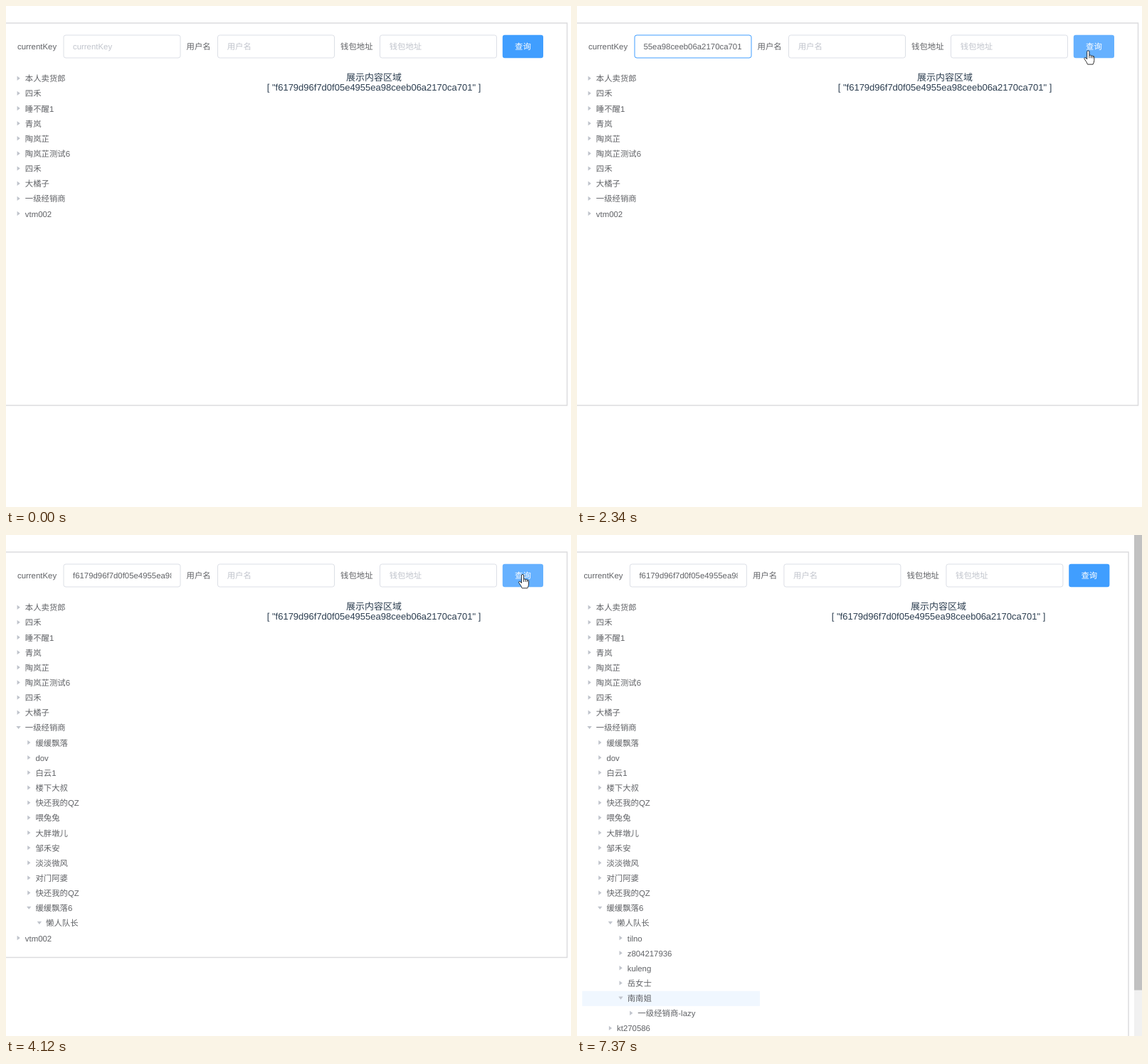
These frames come from a looping animation (794x705 px, 8000 ms). An HTML page:

```html
<!DOCTYPE html>
<html lang="zh-CN">
<head>
<meta charset="utf-8">
<title>Tree search</title>
<style>
  html, body { margin: 0; width: 100%; height: 100%; overflow: hidden; background: #fff; }
  svg { display: block; width: 794px; height: 705px; }
  text {
    font: 11.4px "Liberation Sans", Arial, "Noto Sans CJK SC", "Noto Sans CJK", sans-serif;
    fill: #606266; text-rendering: geometricPrecision; white-space: pre;
  }
  .hint { fill: #c0c4cc; }
  .result text { font-size: 13px; fill: #2c3e50; text-anchor: middle; }
  .box { fill: #fff; stroke: #dcdfe6; }
  .caret { fill: #c0c4cc; }
  .pointer { fill: #fff; stroke: #000; stroke-width: .8; stroke-linejoin: round; }
</style>
</head>
<body>
<svg viewBox="0 0 794 705">
  <defs>
    <clipPath id="valueClip"><rect x="93.5" y="42" width="138.8" height="30"/></clipPath>
    <clipPath id="branchClip"><rect id="branchArea" x="0" y="282.4" width="300" height="0"/></clipPath>
  </defs>
  <rect id="panel" x="-20" y="24" fill="none" stroke="#dcdcde" stroke-width="1.5"/>
  <rect id="current" x="7.3" y="641.7" width="249.7" height="21.15" fill="#f0f7ff"/>
  <g id="roots"></g>
  <g id="branch" clip-path="url(#branchClip)"></g>
  <g id="last"></g>
  <g id="form">
    <g id="fields"></g>
    <g clip-path="url(#valueClip)"><text id="value" y="61"></text></g>
    <rect id="textCaret" y="50.5" width="1" height="13" fill="#303133"/>
    <rect id="button" x="697.8" y="40.7" width="57.2" height="32.5" rx="3.2"/>
    <text x="726.4" y="61" text-anchor="middle" style="fill:#fff">查询</text>
  </g>
  <g id="result" class="result">
    <text x="517" y="105.3">展示内容区域</text>
    <text id="keyLine" x="517" y="119.1"></text>
  </g>
  <g id="scrollbar">
    <rect x="783" width="11" height="705" fill="#f1f1f1"/>
    <rect x="783" width="11" height="640.5" fill="#c1c1c1"/>
  </g>
  <g id="cursor">
    <path id="arrow" class="pointer" d="M.5 .5V13.6L3.5 10.8L5.7 16L7.8 15.1L5.6 10H9.6Z"/>
    <path id="beam" d="M-3 -6.5H-.7L0 -6L.7 -6.5H3M0 -6V6M-3 6.5H-.7L0 6L.7 6.5H3" fill="none" stroke="#222" stroke-width="1.1"/>
    <path id="hand" class="pointer" d="M-1.6 11.5V1Q-1.6 -.5 0 -.5T1.6 1V6.2Q3 5 4.2 6.8Q5.6 5.8 6.6 7.4Q8.5 6.8 8.5 9V13Q8.5 15.5 6.8 18.8H-.8Q-2 15.5-5 11.6Q-6 9.8-4.6 9.2Q-3.4 9-1.6 11.5ZM1.6 6.2V10M4.2 6.8V10M6.6 7.4V10.2"/>
  </g>
</svg>
<script>
const $ = id => document.getElementById(id);
const NS = 'http://www.w3.org/2000/svg';
const LOOP = 8000, TICK = 77.6;
const ROW = 21.15, TREE_TOP = 92, INDENT = 14.64;
const KEY = 'f6179d96f7d0f05e4955ea98ceeb06a2170ca701';

function add(parent, tag, attrs, text = '') {
  const el = document.createElementNS(NS, tag);
  for (const name in attrs) el.setAttribute(name, attrs[name]);
  el.textContent = text;
  parent.append(el);
  return el;
}
const set = (id, name, value) => $(id).setAttribute(name, value);
const show = (id, on) => set(id, 'visibility', on ? 'visible' : 'hidden');
const shift = (id, x, y) => set(id, 'transform', `translate(${x} ${y})`);

const RIGHT = 'M-2 -3.2L2.2 0L-2 3.2Z', DOWN = 'M-3.2 -2H3.2L0 2.2Z';
function addRow(parent, index, level, label, open) {
  const x = 17.6 + level * INDENT, mid = TREE_TOP + (index + .5) * ROW;
  add(parent, 'text', { x: x + 9.2, y: mid + 3.7 }, label);
  return add(parent, 'path', { class: 'caret', d: open ? DOWN : RIGHT, transform: `translate(${x} ${mid - .9})` });
}

const roots = ['本人卖货郎', '四禾', '睡不醒1', '青岚', '陶岚芷', '陶岚芷测试6', '四禾', '大橘子', '一级经销商'];
const children = ['缓缓飘落', 'dov', '白云1', '楼下大叔', '快还我的QZ', '喂兔兔', '大胖墩儿', '邹禾安',
  '淡淡微风', '对门阿婆', '快还我的QZ'];
const nested = [[1, '缓缓飘落6', true], [2, '懒人队长', true], [3, 'tilno'], [3, 'z804217936'], [3, 'kuleng'],
  [3, '岳女士'], [3, '南南姐', true], [4, '一级经销商-lazy'], [2, 'kt270586']];
const branchRows = [...children.map(name => [1, name]), ...nested];

const rootCarets = roots.map((name, i) => addRow($('roots'), i, 0, name));
const dealerCaret = rootCarets[8];
branchRows.forEach(([level, name, open], i) => addRow($('branch'), 9 + i, level, name, open));
addRow($('last'), 9, 0, 'vtm002');

const boxes = [[16, 'currentKey', 81], [253.5, '用户名', 297.5], [470, '钱包地址', 525.5]].map(([x, label, left], i) => {
  add($('fields'), 'text', { x, y: 61 }, label);
  const box = add($('fields'), 'rect', { class: 'box', x: left, y: 41, width: 164, height: 32, rx: 3 });
  if (i) add($('fields'), 'text', { class: 'hint', x: left + 13.2, y: 61 }, label);
  return box;
});
$('keyLine').textContent = `[ "${KEY}" ]`;

// Pointer path: tick, x, y of the hotspot
const track = [[1, 708, 655], [4, 520, 330], [7, 300, 80], [9, 170, 52], [11, 127, 66], [12, 127, 67], [13, 127, 67],
  [14, 131, 69], [19, 204, 67], [21, 235, 70], [26, 677, 93], [28, 703, 78], [31, 726, 56], [56, 726, 56],
  [60, 677, 100], [64, 260, 600], [66, 75, 641], [67, 91, 641], [68, 91, 642], [69, 91, 642], [70, 110, 650], [75, 743, 546]];

function pointerAt(k) {
  const i = Math.max(1, track.findIndex(p => p[0] >= k));
  const [k0, x0, y0] = track[i - 1], [k1, x1, y1] = track[i];
  const f = (k - k0) / (k1 - k0);
  return [x0 + (x1 - x0) * f, y0 + (y1 - y0) * f];
}

function drawPointer(k, dx) {
  const visible = k >= 1 && k <= 75;
  let kind = '', onButton = false;
  if (visible) {
    const [x, y] = pointerAt(k);
    const inForm = y > 41 && y < 73, fx = x - dx;
    onButton = inForm && fx > 698 && fx < 755;
    const onInput = inForm && [81, 297, 525].some(left => fx > left && fx < left + 164);
    const onTree = y > TREE_TOP && x < 257;
    kind = onInput ? 'beam' : onButton || onTree ? 'hand' : 'arrow';
    shift('cursor', x, y);
  }
  for (const id of ['arrow', 'beam', 'hand']) show(id, id === kind);
  return onButton;
}

function drawInput(k) {
  const pasted = k >= 20, focused = k >= 14 && k < 33;
  const value = $('value');
  value.textContent = pasted ? KEY : 'currentKey';
  value.setAttribute('class', pasted ? '' : 'hint');
  const atEnd = pasted && focused;
  value.setAttribute('x', atEnd ? 231.5 : 94);
  value.setAttribute('text-anchor', atEnd ? 'end' : 'start');
  set('textCaret', 'x', atEnd ? 231 : 93.6);
  show('textCaret', k >= 14 && k < 27);
  boxes[0].style.stroke = k === 16 || k === 33 ? '#8ebfee' : k > 16 && k < 33 ? '#409eff' : '#dcdfe6';
}

function drawTree(k) {
  const full = k >= 54;
  const p = Math.min(1, Math.max(0, (k - 49) / 4));
  const height = full ? branchRows.length * ROW : 13 * ROW * p * p * (3 - 2 * p);
  set('branchArea', 'height', height);
  shift('last', 0, height);
  dealerCaret.setAttribute('d', k >= 50 ? DOWN : RIGHT);
  show('current', full);
  show('scrollbar', full);
  const bottom = Math.max(562, TREE_TOP + 10 * ROW + height + 16);
  set('panel', 'width', full ? 795 : 808.5);
  set('panel', 'height', bottom - 24);
}

function draw() {
  const k = Math.floor(performance.now() % LOOP / TICK + .26);
  const full = k >= 54, dx = full ? -6.6 : 0;
  drawTree(k);
  drawInput(k);
  shift('form', dx, 0);
  shift('result', full ? -9 : 0, 0);
  const hovered = drawPointer(k, dx);
  const pressed = k >= 33 && k < 35, active = hovered || (k >= 33 && k < 95);
  set('button', 'fill', pressed ? '#3a8ee6' : active ? '#66b1ff' : '#409eff');
  requestAnimationFrame(draw);
}
draw();
</script>
</body>
</html>
```
